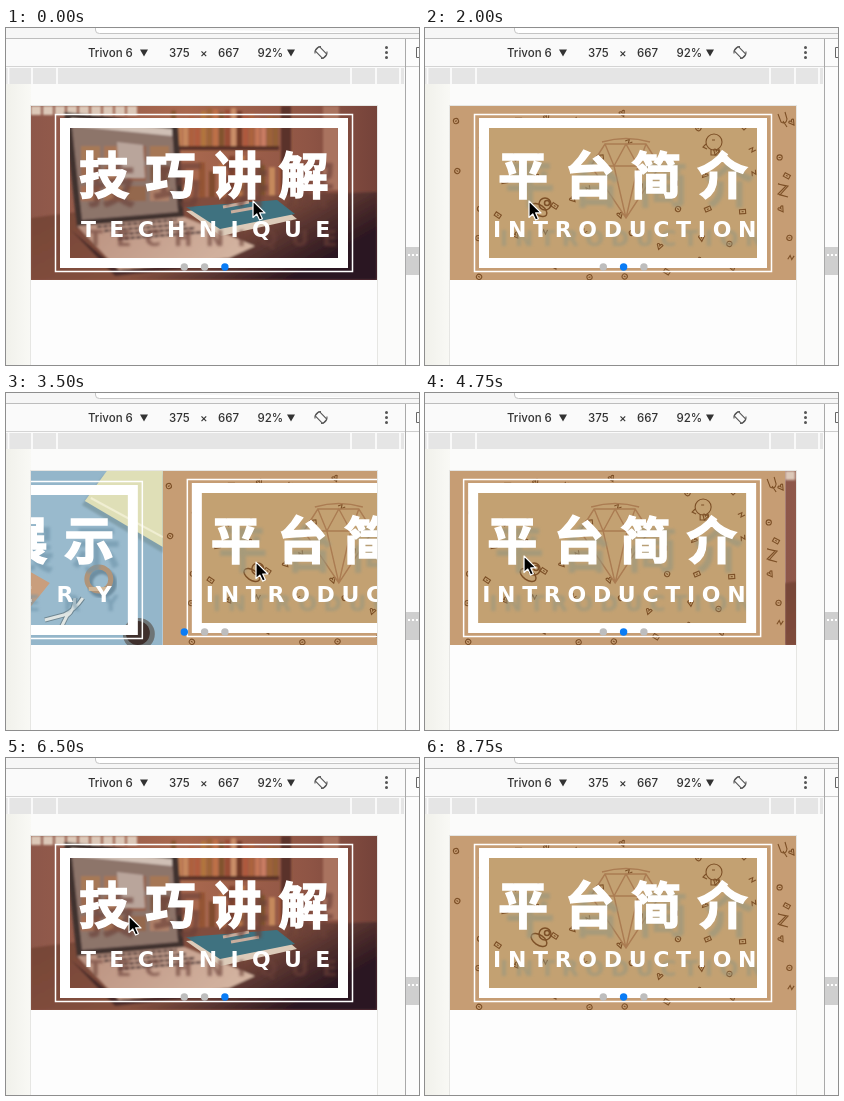
An HTML page for the animation above (9000 ms loop, 413x337 px).

```html
<!DOCTYPE html>
<html lang="zh">
<head>
<meta charset="utf-8">
<title>Carousel preview</title>
<style>
  html, body { margin: 0; width: 100%; height: 100%; overflow: hidden; background: #fbfbfa; }
  svg { display: block; width: 413px; height: 337px; }
  .bar { font: 500 11.5px Inter, "Open Sans", sans-serif; fill: #333; }
  .title { font: 900 50px "Noto Sans CJK SC", "Noto Sans CJK", "Noto Sans CJK JP", sans-serif; text-anchor: middle; stroke-width: 1.6; }
  .sub { font: 700 22px "DejaVu Sans", sans-serif; stroke: none; }
</style>
</head>
<body>
<svg viewBox="0 0 413 337" xmlns="http://www.w3.org/2000/svg">
  <defs>
    <clipPath id="view"><rect x="25" y="78" width="346" height="174"/></clipPath>
    <clipPath id="page"><rect width="346" height="174"/></clipPath>
    <linearGradient id="edge"><stop stop-color="#f1f1eb"/><stop offset="1" stop-color="#f9f9f5"/></linearGradient>
    <linearGradient id="wall">
      <stop stop-color="#8d574a"/><stop offset=".45" stop-color="#a9684e"/><stop offset=".8" stop-color="#8f5545"/><stop offset="1" stop-color="#75433a"/>
    </linearGradient>
    <linearGradient id="desk" x2="1" y2=".45">
      <stop stop-color="#734335"/><stop offset=".6" stop-color="#85513f"/><stop offset="1" stop-color="#2a1620"/>
    </linearGradient>
    <linearGradient id="palm" x2="1" y2=".3">
      <stop stop-color="#b98f7d"/><stop offset="1" stop-color="#d3b3a0"/>
    </linearGradient>
    <filter id="soft"><feGaussianBlur stdDeviation=".9"/></filter>
    <filter id="haze"><feGaussianBlur stdDeviation="1.8"/></filter>
  </defs>

  <rect width="413" height="337" fill="#fbfbfa"/>
  <rect y="56" width="25" height="281" fill="url(#edge)"/>

  <!-- toolbar -->
  <rect width="413" height="10" fill="#f6f6f6"/>
  <path d="M89.500 0v2q0 3.500 4 3.500H413" fill="#fff" stroke="#c4c4c4"/>
  <path d="M0 10.500H413" stroke="#bdbdbd"/>
  <rect y="11" width="413" height="27" fill="#fafafa"/>
  <g class="bar">
    <text x="82" y="29">Trivon 6</text>
    <text x="163" y="29">375</text>
    <text x="194" y="29">×</text>
    <text x="212" y="29">667</text>
    <text x="251.500" y="29">92%</text>
  </g>
  <path d="M134 21.500h8l-4 7zM281 21.500h8l-4 7z" fill="#333"/>
  <g transform="translate(315 24.500)" fill="none" stroke="#555" stroke-width="1.100">
    <rect x="-3" y="-5.500" width="6" height="11" rx="1" transform="rotate(-45)"/>
    <path d="M-6 1A6 6 0 0 1 0 -6M6 -1A6 6 0 0 1 0 6"/>
  </g>
  <path d="M380.500 19.500v.01M380.500 24.500v.01M380.500 29.500v.01" stroke="#555" stroke-width="3" stroke-linecap="round"/>

  <!-- ruler -->
  <rect y="38" width="399" height="18" fill="#fbfbfb"/>
  <path d="M0 38.500H399" stroke="#d4d4d4"/>
  <rect y="40" width="398" height="16" fill="#e5e5e5"/>
  <path d="M2.500 40v16M26 40v16M51 40v16M345 40v16M370 40v16M394 40v16" stroke="#fbfbfb" stroke-width="1.800"/>

  <!-- side panel -->
  <rect x="400" y="11" width="13" height="326" fill="#fcfcfc"/>
  <path d="M399.500 11V337" stroke="#a9a9a9"/>
  <path d="M400 38.500h13" stroke="#ccc"/>
  <path d="M413 19.500h-2.500v10h2.500" fill="none" stroke="#666"/>
  <rect x="400" y="219" width="13" height="28" fill="#cfcfcf"/>
  <path d="M402 227h11" stroke="#fff" stroke-width="2" stroke-dasharray="2"/>

  <!-- page -->
  <rect x="24.500" y="77.500" width="347" height="270" fill="#fdfdfd" stroke="#e6e6e3"/>
  <g clip-path="url(#view)"><g id="track"></g></g>
  <g id="dots"></g>
  <path id="cursor" d="M0 0V16.500L3.800 13L6.600 19L9.400 17.700L6.700 11.900H12Z" fill="#000" stroke="#fff" stroke-width="1.200" stroke-linejoin="round"/>
</svg>

<script>
const W = 346, LOOP = 9000, STEP = 250, SWIPE = 650;
const [track, dots, cursor] = ['track', 'dots', 'cursor'].map(id => document.getElementById(id));

let seed = 11;
const rand = () => (seed = (seed * 16807) % 2147483647) / 2147483647;
const repeat = (n, make) => Array.from({ length: n }, (_, i) => make(i)).join('');
const shape = (d, fill) => `<path d="${d}" fill="${fill}"/>`;
const box = (x, y, w, h, fill) => `<rect x="${x}" y="${y}" width="${w}" height="${h}" fill="${fill}"/>`;

const frame = `<g fill="none" stroke="#fff">
  <rect x="24.500" y="8.500" width="297" height="157" stroke-width="1.500"/>
  <rect x="34" y="17" width="278" height="140" stroke-width="10"/></g>`;

function lettering({ title, sub, left, gap }) {
  const chars = [...title].map((c, i) => `<tspan x="${73 + i * 66.5}">${c}</tspan>`).join('');
  return `<text class="title" y="88">${chars}</text>
    <text class="sub" x="${left}" y="130.500" letter-spacing="${gap}">${sub}</text>`;
}

function slide(index, { art, shade, shift = '0 0', ...words }) {
  const text = lettering(words);
  return `<g transform="translate(${index * W})" clip-path="url(#page)">${art}
    <g fill="${shade}" transform="translate(7 9)" filter="url(#haze)" opacity=".65">${text}</g>
    <g transform="translate(${shift})">${frame}</g>
    <g fill="#fff" stroke="#fff">${text}</g></g>`;
}

function gallery() {
  const plier = 'M266 127Q258 139 247 144L228 149M258 127Q258 139 250 145L242 161';
  return box(0, 0, W, 174, '#94b6ca') + box(43, 24, 268, 130, '#99bacd')
    + `<g filter="url(#soft)">${shape('M265 34L287 4H346V82z', '#809fab')}</g>`
    + shape('M268 30L290 0H346V76z', '#dfdfb7')
    + '<path d="M274 27L346 66" stroke="#f0eed2" stroke-width="2"/>'
    + shape('M170 86L205 96L233 112L212 138L170 150z', '#c99e7d')
    + shape('M0 0H60L42 52L0 38z', '#d9c5a4')
    + `<g fill="none">
      <circle cx="285" cy="112" r="12" stroke="#6d8da0" stroke-width="6" filter="url(#soft)"/>
      <circle cx="282" cy="108" r="12" stroke="#b09479" stroke-width="5"/>
      <path d="M272 118h20" stroke="#d0b697" stroke-width="4"/>
      <path d="${plier}" stroke="#6f8793" stroke-width="5"/>
      <path d="${plier}" stroke="#dfe5e3" stroke-width="3"/></g>`
    + '<circle cx="322" cy="163" r="16" fill="#6d7476"/><circle cx="321" cy="162" r="12" fill="#3f302d"/>';
}

function doodles() {
  const kinds = [
    '<circle r="2.600"/><path d="M-1 0h2"/>',
    '<rect x="-3" y="-2" width="6" height="4"/><path d="M-1 0h2"/>',
    '<path d="M-3 -2L0 3L3 -2Q1 -4 0 -1Q-1 -4 -3 -2"/>',
    '<path d="M-3 2L-1 -2L1 2L3 -2"/>'
  ];
  return repeat(54, i => {
    const x = 6 + (i % 9 + rand() * .7) * 39;
    const y = 6 + (Math.floor(i / 9) + rand() * .7) * 29;
    return `<g transform="translate(${x} ${y}) rotate(${rand() * 90 - 45})">${kinds[Math.floor(rand() * 4)]}</g>`;
  });
}

function intro() {
  return box(0, 0, W, 174, '#c69d74') + box(39, 22, 268, 130, '#c3a172')
    + `<g fill="none" stroke="#7d5027" stroke-width="1.100">${doodles()}
      <circle cx="264" cy="36" r="8"/><path d="M256 38l-3 3l4 2M261 44v5h8v-6M262 34h3"/>
      <path d="M328 8l3 8q5 3 6-3l-2-7M333 15l4 6"/>
      <path d="M328 78l10 2l-8 9l8 2l-10 -3l8-8z"/>
      <g stroke-width="1.500"><circle cx="95" cy="98" r="6"/><ellipse cx="89" cy="104" rx="9" ry="5" transform="rotate(35 89 104)"/><circle cx="97" cy="97" r="2.500"/></g></g>`
    + `<path d="M141 60L155 38H196L210 60L176 112ZM141 60H210M155 38L164 60L176 112L188 60L196 38M164 60L176 38L188 60M152 36q24-7 48 0"
        fill="none" stroke="#ab7c52" stroke-width="1.400"/>`;
}

function technique() {
  const hue = () => `hsl(${14 + rand() * 14} 48% ${30 + rand() * 32}%)`;
  const curtain = repeat(9, i => box(i * 12, 0, 10, 9, '#dcc8b8'));
  const shelf = repeat(18, i => {
    const h = 24 + rand() * 14;
    return box(140 + i * 6, 40 - h, 5, h, hue());
  });
  const pots = repeat(9, i => box(168 + i * 10, 48 + rand() * 18, 6, 40, hue()));
  const panes = repeat(12, i => box(50 + (i % 4) * 23, 40 + Math.floor(i / 4) * 20, 19, 15, hue()));
  const keys = repeat(4, i => `<path d="M${66 + i * 7} ${121 + i * 4}L${146 + i * 9} ${114 + i * 4}" stroke="#5f4845" stroke-width="2.600" stroke-dasharray="5 1"/>`);
  return box(0, 0, W, 174, 'url(#wall)')
    + '<g filter="url(#soft)">'
    + curtain + shelf + box(136, 40, 112, 4, '#5a3028') + pots
    + box(250, 0, 10, 92, '#5a3129') + box(292, 0, 16, 84, '#a9735f')
    + shape('M0 112L150 92L346 86V174H0z', 'url(#desk)')
    + shape('M33 6L147 18L153 112L46 122z', '#40302f')
    + shape('M40 12L141 23L147 106L51 114z', '#8d746b')
    + shape('M40 12L141 23V30L41 20z', '#d0c0b5')
    + `<g opacity=".55">${panes}</g>`
    + shape('M86 36L112 39L114 72L88 72z', '#b9a59b')
    + shape('M46 120L153 111L224 140L198 152L88 164z', 'url(#palm)') + keys
    + shape('M40 124L88 164L198 154V158L84 170z', '#4a2c29')
    + '</g>'
    + shape('M155 105L247 97L266 113L190 130z', '#dccbb9')
    + shape('M155 101L246 94L264 108L189 123z', '#3f7280')
    + '<path d="M192 101l26 -5M200 106l28 -5" stroke="#c9ae9e" stroke-width="3"/>';
}

track.innerHTML = [
  { art: gallery(), shade: '#6f95ab', shift: '4 2', title: '作品展示', sub: 'GALLERY', left: 44, gap: 23.5 },
  { art: intro(), shade: '#98977f', title: '平台简介', sub: 'INTRODUCTION', left: 43, gap: 6.7 },
  { art: technique(), shade: '#6b4038', title: '技巧讲解', sub: 'TECHNIQUE', left: 50, gap: 13.3 }
].map((s, i) => slide(i, s)).join('');

dots.innerHTML = repeat(3, i => `<circle cx="${178.3 + i * 20.3}" cy="239" r="3.700"/>`);

// swipes: start time, page to reach; hand: time, cursor x
const swipes = [[500, 1], [3227, 0], [4000, 1], [4681, 2], [6550, 1], [7284, 0], [8050, 1]];
const hand = [[0, 247], [450, 104], [800, 250], [1800, 104], [3150, 104], [3400, 250], [4000, 250],
  [4300, 110], [4750, 99], [6500, 123], [6800, 250], [7250, 104], [7450, 250], [8050, 250], [8350, 104], [8750, -30]];

const smooth = (t, from, to) => {
  const u = Math.min(1, Math.max(0, (t - from) / (to - from)));
  return u * u * (3 - 2 * u);
};

function scroll(t) {
  let page = 2, dot = 2;
  for (const [start, next] of swipes) {
    const k = smooth(t, start, start + SWIPE);
    page += (next - page) * k;
    if (k > .2) dot = next;
  }
  return { page, dot };
}

function handX(t) {
  return hand.reduce((x, [time, next], i) =>
    i ? x + (next - x) * smooth(t, hand[i - 1][0], time) : next, 0);
}

function draw(time) {
  const t = Math.floor((time % LOOP) / STEP) * STEP;
  const { page, dot } = scroll(t);
  const y = 173 - 15 * smooth(t, 2000, 6500);
  track.setAttribute('transform', `translate(${25 - page * W} 78)`);
  cursor.setAttribute('transform', `translate(${handX(t)} ${y})`);
  [...dots.children].forEach((c, i) => c.setAttribute('fill', i === dot ? '#0a7cf5' : '#bdbdbd'));
}

const start = performance.now();
function tick() {
  draw(performance.now() - start);
  requestAnimationFrame(tick);
}
tick();
</script>
</body>
</html>
```
